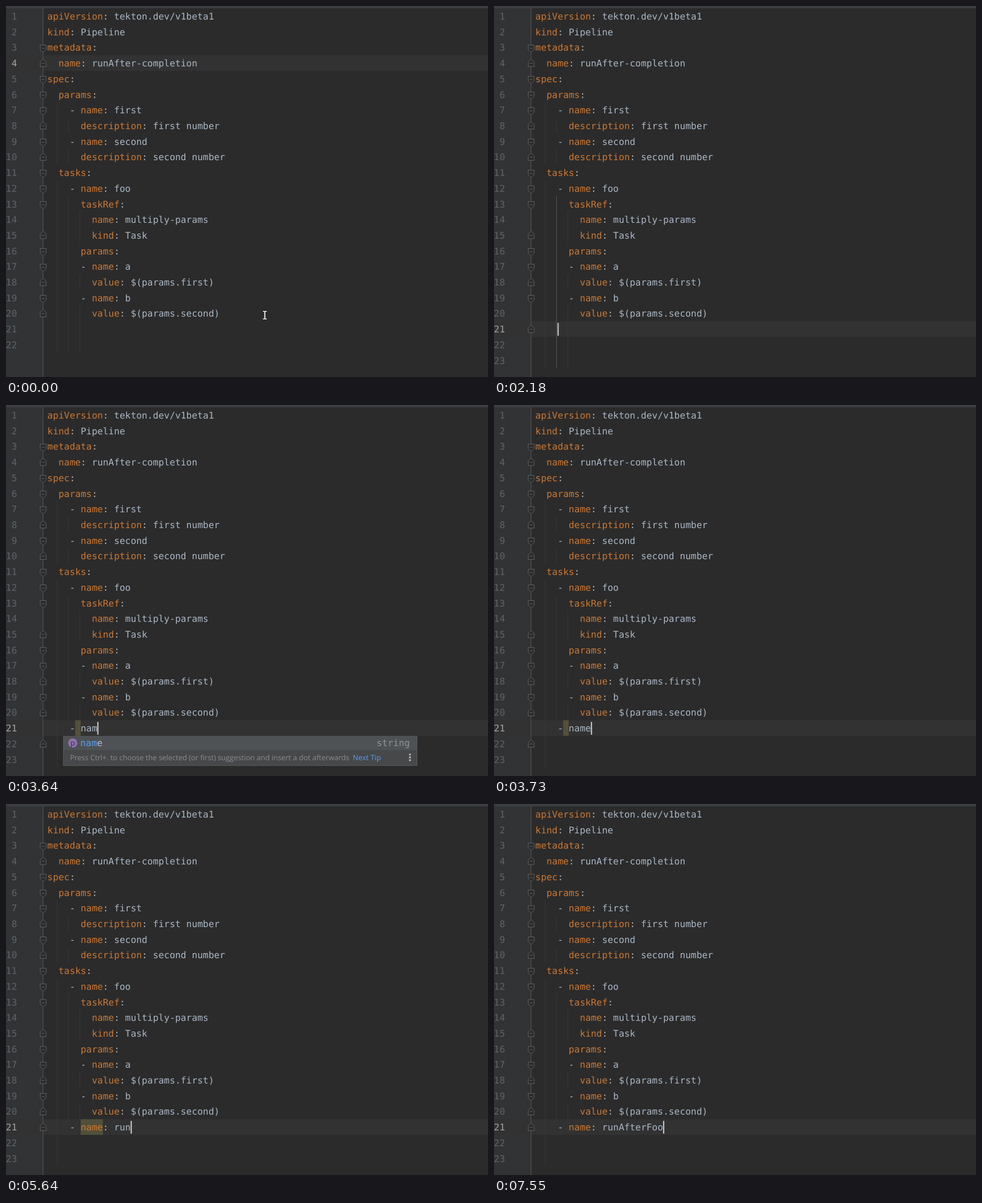
An HTML page with a canvas that plays this animation: 852x657 px, repeating every 8000 ms.

```html
<!DOCTYPE html>
<html lang="en">
<head>
<meta charset="utf-8">
<title>YAML editor</title>
<style>
html, body { margin: 0; width: 100%; height: 100%; overflow: hidden; background: #2b2b2b; }
canvas { display: block; }
</style>
</head>
<body>
<canvas id="stage" width="852" height="657"></canvas>
<script>
const ctx = document.getElementById('stage').getContext('2d');
ctx.textRendering = 'geometricPrecision';
const W = 852, H = 657, DURATION = 8000;
const LEFT = 73.1, CHAR = 9.82, TOP = 4, ROW = 27.71, BASELINE = 20;
const MONO = '16.31px "DejaVu Sans Mono", monospace';
const PLAIN = '#a9b7c6', KEY = '#cc7832', OLIVE = '#52503a', BLUE = '#589df6';

const SOURCE = `apiVersion: tekton.dev/v1beta1
kind: Pipeline
metadata:
  name: runAfter-completion
spec:
  params:
    - name: first
      description: first number
    - name: second
      description: second number
  tasks:
    - name: foo
      taskRef:
        name: multiply-params
        kind: Task
      params:
      - name: a
        value: $(params.first)
      - name: b
        value: $(params.second)`.split('\n');

const FOLD_STARTS = [3, 5, 6, 7, 9, 11, 12, 13, 16, 17, 19];
const FOLD_ENDS = [4, 8, 10, 15, 18];

// Each step changes only the listed parts of the editor state.
const STEPS = [
  { t: 0, row: 4, caret: null, count: 22, text: '', keyed: false, ends: [20],
    mark: null, guide: null, nested: true, mouse: true, bulb: false, popup: false },
  { t: 270, row: 20, caret: 31 },
  { t: 1360, row: 21, caret: 8, count: 23, mouse: false },
  { t: 1730, caret: 6 },
  { t: 1820, ends: [21] },
  { t: 2180, caret: 4, guide: [4, 13, 23] },
  { t: 3090, text: '    - ', caret: 6, ends: [20, 21], nested: false, guide: [6, 22, 23] },
  { t: 3360, text: '    - n', caret: 7, guide: null },
  { t: 3450, ends: [20, 22], mark: [5, 6] },
  { t: 3640, text: '    - nam', caret: 9, popup: true },
  { t: 3730, text: '    - name', caret: 10, popup: false },
  { t: 4090, ends: [20, 21], mark: [6, 10] },
  { t: 4730, bulb: true },
  { t: 4910, text: '    - name:', caret: 11, bulb: false },
  { t: 5000, keyed: true },
  ...[[5180, ' '], [5360, ' r'], [5450, ' ru'], [5640, ' run'], [5820, ' runA'],
    [6270, ' runAf'], [6450, ' runAfte'], [6640, ' runAfter'], [7090, ' runAfterF'],
    [7450, ' runAfterFo'], [7550, ' runAfterFoo']]
    .map(([t, value]) => ({ t, text: '    - name:' + value, caret: 11 + value.length })),
  { t: 6270, mark: null }
];

const stateAt = time => Object.assign({}, ...STEPS.filter(step => step.t <= time));
const rowTop = n => TOP + (n - 1) * ROW;
const colX = c => LEFT + c * CHAR;

function rect(x, y, w, h, color) {
  ctx.fillStyle = color;
  ctx.fillRect(x, y, w, h);
}

function disc(x, y, r, color) {
  ctx.fillStyle = color;
  ctx.beginPath();
  ctx.arc(x, y, r, 0, 2 * Math.PI);
  ctx.fill();
}

// Text on the fixed character grid.
function mono(text, x, baseline, color) {
  ctx.font = MONO;
  ctx.fillStyle = color;
  [...text].forEach((ch, i) => ctx.fillText(ch, x + i * CHAR, baseline));
}

function codeLine(text, n, keyed = true) {
  const [, lead, key, rest] = text.match(/^([ -]*)(\w*)(.*)$/);
  const y = rowTop(n) + BASELINE;
  mono(lead, LEFT, y, PLAIN);
  mono(key, colX(lead.length), y, keyed ? KEY : PLAIN);
  mono(rest, colX(lead.length + key.length), y, PLAIN);
}

function guide(col, from, to, color = '#373737') {
  const y = rowTop(from);
  rect(Math.round(colX(col) - 2.3), y, 1, rowTop(to + 1) - y, color);
}

function foldMark(n, isEnd) {
  const y = rowTop(n) + (isEnd ? 20 : 9.8);
  const dir = isEnd ? -1 : 1;
  ctx.beginPath();
  ctx.moveTo(60.5, y);
  ctx.lineTo(71, y);
  ctx.lineTo(71, y + 8 * dir);
  ctx.lineTo(65.75, y + 13 * dir);
  ctx.lineTo(60.5, y + 8 * dir);
  ctx.closePath();
  ctx.fillStyle = '#2b2b2b';
  ctx.fill();
  ctx.strokeStyle = '#606263';
  ctx.lineWidth = 1;
  ctx.stroke();
  rect(63, y + 5.7 * dir - 0.5, 5.5, 1, '#606263');
}

function ibeam() {
  const parts = [[454, 540, 7, 1.5], [456.5, 540, 2, 15], [454, 553.5, 7, 1.5]];
  parts.forEach(([x, y, w, h]) => rect(x - 0.7, y - 0.7, w + 1.4, h + 1.4, '#1c1c1c'));
  parts.forEach(part => rect(...part, '#f0f0f0'));
}

function bulb() {
  disc(87.5, 567, 5, '#f0b94a');
  rect(85, 571, 5, 2, '#f0b94a');
  rect(85, 574, 5, 1, '#afb1b3');
  rect(86, 576, 3, 1, '#afb1b3');
}

function popup() {
  rect(101, 586, 626, 53, '#575a5c');
  rect(102, 586, 624, 25, '#4e5254');
  rect(102, 611, 624, 27, '#46484a');
  disc(118, 598.5, 8, '#8e72b0');
  ctx.font = '13px "Open Sans", sans-serif';
  ctx.textAlign = 'center';
  ctx.fillStyle = '#342b40';
  ctx.fillText('p', 118, 602.5);
  ctx.textAlign = 'left';
  mono('nam', 131.3, 604.4, BLUE);
  mono('e', 131.3 + 3 * CHAR, 604.4, '#bbbbbb');
  mono('string', 655, 604.4, '#929496');
  ctx.font = '12.95px "Open Sans", sans-serif';
  ctx.fillStyle = '#8c8c8c';
  ctx.fillText('Press Ctrl+. to choose the selected (or first) suggestion and insert a dot afterwards', 113.3, 629);
  ctx.fillStyle = BLUE;
  ctx.fillText('Next Tip', 613, 629);
  [619, 624, 629].forEach(y => disc(714, y, 1.7, '#c0c2c4'));
}

function draw(s) {
  rect(0, 0, W, H, '#2b2b2b');
  rect(0, 0, 65, H, '#313335');
  const top = rowTop(s.row);
  rect(0, top, W, ROW, '#323232');
  rect(0, 0, W, 4, '#3c3f41');
  if (s.mark) {
    const [from, to] = s.mark.map(colX);
    rect(from, top, to - from, ROW, OLIVE);
  }

  const last = s.nested ? s.count : 20;
  [[2, 7, 10], [2, 12, s.count], [4, 8, 8], [4, 10, 10], [4, 13, last],
    [6, 14, 15], [6, 18, 18], [6, 20, last]].forEach(g => guide(...g));
  if (s.guide) guide(...s.guide, '#555555');

  rect(65, 4, 1, H - 4, '#555555');
  FOLD_STARTS.forEach(n => foldMark(n, false));
  [...FOLD_ENDS, ...s.ends].forEach(n => foldMark(n, true));

  for (let n = 1; n <= s.count; n++) {
    const label = String(n);
    mono(label, 19.5 - label.length * CHAR, rowTop(n) + BASELINE, n === s.row ? '#a4a3a3' : '#606366');
  }
  SOURCE.forEach((text, i) => codeLine(text, i + 1));
  codeLine(s.text, 21, s.keyed);

  if (s.caret !== null) rect(colX(s.caret) - 0.1, top + 3, 2.1, 22.6, '#cccccc');
  if (s.bulb) bulb();
  if (s.popup) popup();
  if (s.mouse) ibeam();
}

const start = performance.now();
function tick() {
  draw(stateAt((performance.now() - start) % DURATION));
  requestAnimationFrame(tick);
}
tick();
</script>
</body>
</html>
```
